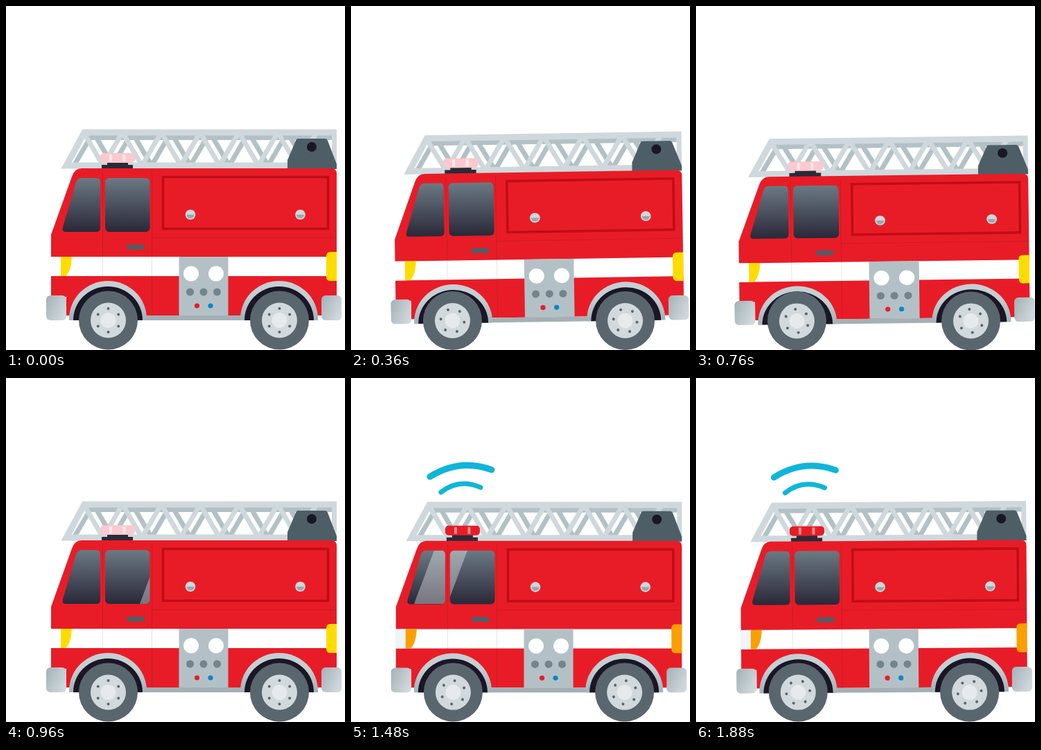
An HTML page for the animation above (1920 ms loop, 489 by 498 pixels).

```html
<!DOCTYPE html>
<html lang="en">
<head>
<meta charset="utf-8">
<title>Fire engine</title>
<style>
html, body { margin: 0; width: 100%; height: 100%; overflow: hidden; background: #fff; }
svg { display: block; }
.lamp { fill: #ffdc00; }
.beacon { fill: #fbc9ce; }
.stripe { fill: #fde9eb; }
.glass { fill: #fff; }
.waves { display: none; }
.on .lamp { fill: #f9a000; }
.on .beacon { fill: #e81c27; }
.on .stripe { fill: #f58d90; }
.on .glass { fill: #f1f5f9; }
.on .waves { display: inline; }
</style>
</head>
<body>
<svg width="489" height="498" viewBox="0 0 489 498">
  <defs>
    <linearGradient id="pane" x2="0" y2="1">
      <stop stop-color="#6b7983"/><stop offset="1" stop-color="#2a2838"/>
    </linearGradient>
    <linearGradient id="chrome" x2="1" y2=".6">
      <stop stop-color="#a3b0b6"/><stop offset="1" stop-color="#d0d8dc"/>
    </linearGradient>
    <linearGradient id="fender" x2="0" y2="1">
      <stop offset=".4" stop-color="#c6cfd3"/><stop offset="1" stop-color="#a3b0b6"/>
    </linearGradient>
    <path id="front" d="M108 249H130Q136 249 136 255V321Q136 327 130 327H86Q80 327 82 320L101 255Q103 249 108 249Z"/>
    <rect id="side" x="143" y="249" width="64.500" height="78" rx="6"/>
    <clipPath id="windows"><use href="#front"/><use href="#side"/></clipPath>
    <g id="arch">
      <path d="M-56 455V453A56 55 0 0 1 56 453V455Z" fill="url(#fender)"/>
      <path d="M-50 455A50 49 0 0 1 50 455Z" fill="#1a1626"/>
    </g>
    <g id="knob">
      <circle r="7.300" fill="#cfd8dc"/><path d="M-5.500 0H5.500A5.500 5.500 0 0 1 -5.500 0Z" fill="#98a7ae"/>
    </g>
    <g id="wheel">
      <circle r="42.500" fill="#5a666e"/>
      <circle r="25.500" fill="#d1d9dd"/>
      <circle r="11" fill="#e6eaec"/>
      <g id="bolts" fill="#5a666e"></g>
    </g>
  </defs>

  <g id="truck">
    <g class="waves" fill="none" stroke="#0fb5d9" stroke-linecap="round">
      <path d="M114 142Q157 115 203 132" stroke-width="9"/>
      <path d="M130 164.500Q156 144 187 157.500" stroke-width="7"/>
    </g>

    <g fill="none" stroke-linejoin="bevel">
      <path id="backBars" stroke="#b2c1c6" stroke-width="7"/>
      <path d="M120 190.500H472" stroke="#b2c1c6" stroke-width="7"/>
      <path d="M473.500 183V235" stroke="#cfd8dc" stroke-width="7"/>
      <path id="frontBars" stroke="#cfd8dc" stroke-width="7"/>
      <path d="M477 183H113L87 231H412" stroke="#cfd8dc" stroke-width="9" stroke-linejoin="miter"/>
    </g>
    <path d="M421 192H460Q463 192 464 195L477 229V236H406V223L418 195Q419 192 421 192Z" fill="#4e5e67"/>
    <circle cx="441" cy="204" r="7" fill="#1a1626"/>

    <path d="M146 226H176V230H183V237H138V230H146Z" fill="#2b2a38"/>
    <rect class="beacon" x="136" y="213" width="50" height="14" rx="5"/>
    <path class="stripe" d="M149 215h4v10h-4zM168.500 215h4v10h-4z"/>

    <path d="M65 331L95 247Q99 235 109 235H469Q477 235 477 243V448H87V421H65Z" fill="#e81c27"/>
    <path d="M65 363H477V391H65Z" fill="#fff"/>
    <path class="glass" d="M64 363H80V391H64Z"/>
    <path class="lamp" d="M79 363H95Q94 384 86 391H79Z"/>
    <path class="lamp" d="M477 356H468Q462 356 462 362V392Q462 398 468 398H477Z"/>
    <path d="M139.500 240V392M210.500 240V448M210 335.500H477" fill="none" stroke="#000" stroke-opacity=".1"/>

    <use href="#front" fill="url(#pane)"/>
    <use href="#side" fill="url(#pane)"/>
    <g clip-path="url(#windows)">
      <path id="gleam" d="M0 249H-48L-77 327H-29Z" fill="#fff" fill-opacity=".36"/>
    </g>
    <rect x="174" y="345.500" width="26" height="7" rx="3.500" fill="#4e5e67"/>

    <rect x="226.500" y="247.500" width="238" height="75" fill="none" stroke="#bf0d16" stroke-width="3.500"/>
    <use href="#knob" x="266" y="302"/>
    <use href="#knob" x="424.500" y="302"/>

    <path d="M190 448H350V455H190Z" fill="#a3b0b6"/>
    <path d="M249.500 363H320.500V448H249.500Z" fill="#b3c1c6"/>
    <g fill="#fff"><circle cx="267" cy="387.500" r="11"/><circle cx="303" cy="387.500" r="11"/></g>
    <g fill="#74848c">
      <circle cx="265.500" cy="414" r="5.500"/><circle cx="285" cy="414" r="5.500"/><circle cx="304.500" cy="414" r="5.500"/>
    </g>
    <circle cx="275.500" cy="434" r="3.600" fill="#e81c27"/>
    <circle cx="295" cy="434" r="3.600" fill="#0b86c8"/>

    <use href="#arch" x="147"/>
    <use href="#arch" x="394"/>
    <rect x="58" y="419" width="29" height="36" rx="6" fill="url(#chrome)"/>
    <rect x="455" y="419" width="29" height="36" rx="6" fill="url(#chrome)"/>
  </g>
  <use class="wheel" href="#wheel"/>
  <use class="wheel" href="#wheel"/>
</svg>
<script>
const LOOP = 1920, STEP = 40, BOUNCE = 480, BLINK = 320, SPIN = 640;
const $ = id => document.getElementById(id);
const truck = $("truck"), gleam = $("gleam"), wheels = document.querySelectorAll(".wheel");

const zigzag = x => `M${x} 183` + "l28 48l28 -48".repeat(6);
$("frontBars").setAttribute("d", zigzag(112));
$("backBars").setAttribute("d", "M126 183l-28 48" + zigzag(126));
for (let a = 0; a < 360; a += 60) {
  $("bolts").innerHTML += `<circle cy="-17" r="2" transform="rotate(${a})"/>`;
}

function draw(now) {
  const t = Math.floor(now % LOOP / STEP) * STEP;
  const p = t % BOUNCE;
  const squash = (1 - Math.cos(2 * Math.PI * p / BOUNCE)) / 2;
  const tilt = p > 200 ? -0.9 * Math.sin(Math.PI * (p - 200) / 280) : 0;
  const sx = 1 + 0.0175 * squash, sy = 1 - 0.028 * squash;
  const mapX = x => 270 + (x - 270) * sx;

  truck.setAttribute("transform",
    `rotate(${tilt} 270 345) matrix(${sx} 0 0 ${sy} ${mapX(0)} ${17.5 * squash})`);
  truck.classList.toggle("on", t % BLINK >= BLINK / 2);

  const angle = -360 * t / SPIN;
  [147.5, 394.5].forEach((x, i) => wheels[i].setAttribute("transform",
    `translate(${mapX(x)} ${455 + squash}) rotate(${angle})`));

  // One reflection crosses both windows per wheel turn
  gleam.setAttribute("transform", `translate(${168 + (t % SPIN - 200) * 0.85})`);
}

function tick(now) {
  draw(now);
  requestAnimationFrame(tick);
}
draw(0);
requestAnimationFrame(tick);
</script>
</body>
</html>
```
